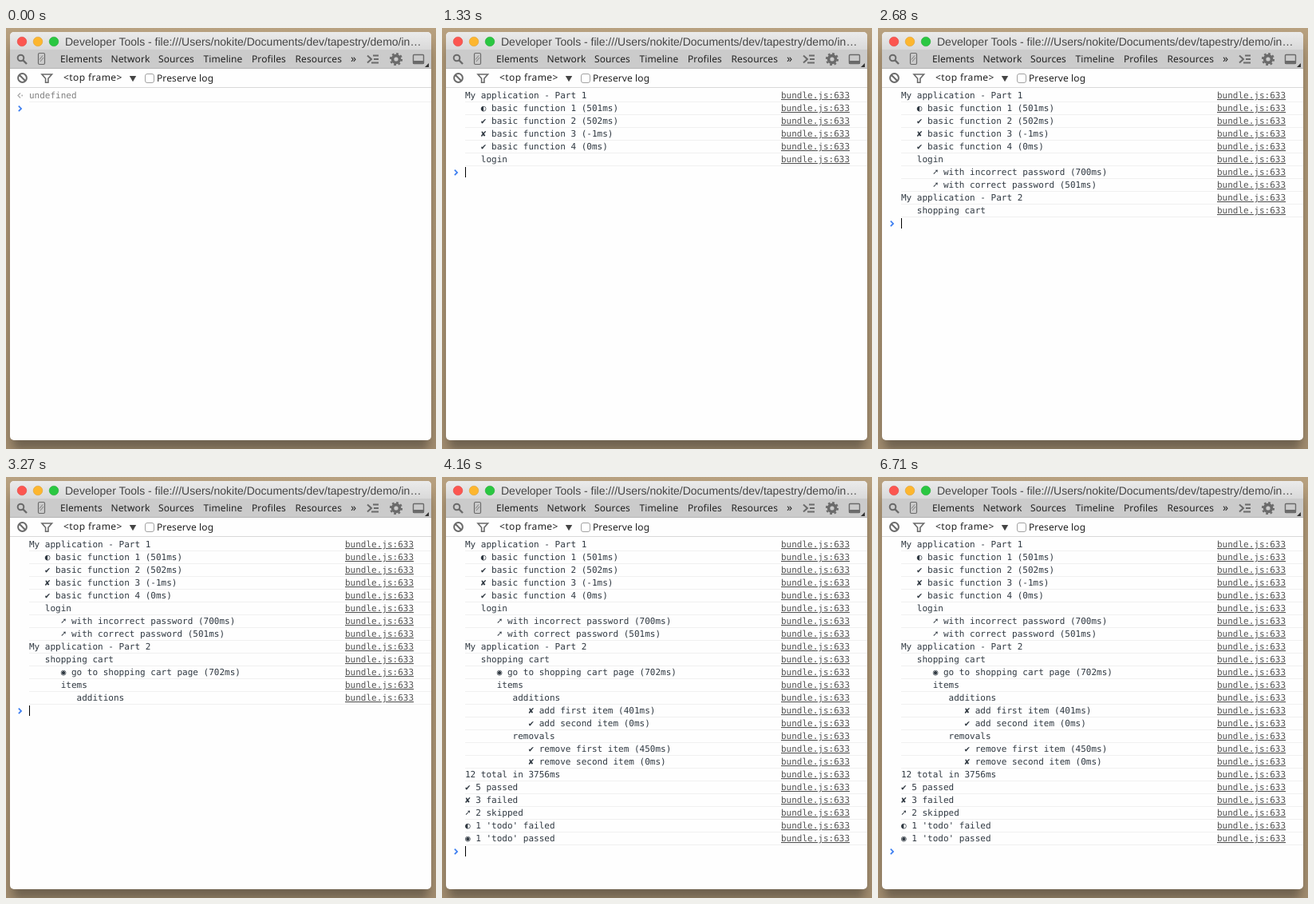
An HTML page for the animation above (7.13 s loop, 539 by 527 pixels).

```html
<!DOCTYPE html>
<html lang="en">
<head>
<meta charset="utf-8">
<title>Console test report</title>
<style>
  html, body { margin: 0; width: 100%; height: 100%; overflow: hidden; background: #a08a6b; }
  svg { display: block; width: 539px; height: 527px; }
  text { text-rendering: geometricPrecision; white-space: pre; }
  .title { font: 14px "Liberation Sans", Arial, sans-serif; fill: #454545; }
  .ui { font: 12px "Noto Sans", "Open Sans", sans-serif; letter-spacing: .1px; fill: #222; }
  .mono { font: 11px "DejaVu Sans Mono", monospace; fill: #303942; }
  .link { fill: #545454; text-decoration: underline; }
  .icon { fill: none; stroke: #6a6a6a; stroke-width: 2; }
</style>
</head>
<body>
<svg viewBox="0 0 539 527">
  <defs>
    <linearGradient id="desk" x2="0" y2="1">
      <stop offset="0" stop-color="#b8a180"/>
      <stop offset=".08" stop-color="#ab9473"/>
      <stop offset=".9" stop-color="#a18b6c"/>
      <stop offset="1" stop-color="#a18c6f"/>
    </linearGradient>
    <linearGradient id="bar" x2="0" y2="1">
      <stop offset="0" stop-color="#ebebeb"/>
      <stop offset="1" stop-color="#d9d9d9"/>
    </linearGradient>
    <filter id="soft" x="-10%" y="-10%" width="120%" height="120%">
      <feGaussianBlur stdDeviation="6"/>
    </filter>
    <clipPath id="frame"><rect x="5" y="5" width="528" height="511" rx="5"/></clipPath>
  </defs>

  <rect width="539" height="527" fill="url(#desk)"/>
  <rect x="8" y="20" width="522" height="508" rx="8" fill="#50463a" opacity=".6" filter="url(#soft)"/>

  <g clip-path="url(#frame)">
    <rect x="5" y="5" width="528" height="511" fill="#fefefe"/>
    <rect x="5" y="5" width="528" height="22" fill="url(#bar)"/>
    <rect x="5" y="27" width="528" height="24" fill="#cbcbcb"/>
    <rect x="5" y="50" width="528" height="1" fill="#b4b4b4"/>
    <rect x="5" y="74" width="528" height="1" fill="#d8d8d8"/>
  </g>

  <g stroke-width=".6">
    <circle cx="20" cy="17" r="5.8" fill="#fc5650" stroke="#df443f"/>
    <circle cx="40" cy="17" r="5.8" fill="#fdb62e" stroke="#de9f30"/>
    <circle cx="60" cy="17" r="5.8" fill="#2ac741" stroke="#22aa34"/>
  </g>
  <text class="title" x="74" y="22">Developer Tools - file:///Users/nokite/Documents/dev/tapestry/demo/in…</text>

  <g class="icon">
    <circle cx="18.5" cy="37.5" r="3.8"/>
    <path d="M21.5 40.5l4.5 4.5" stroke-width="2.4"/>
    <rect x="40.5" y="31.5" width="8" height="14" rx="1.5" stroke-width="1.2"/>
    <path d="M42 39.5l4-5M43 42l4-5" stroke-width=".8"/>
    <path d="M453 34.5l5 4.5l-5 4.5M460 34.5h7M461 39h6M458 43.5h9"/>
    <circle cx="489" cy="39" r="4.4" stroke-width="3.6"/>
    <circle cx="489" cy="39" r="7" stroke-width="2.2" stroke-dasharray="2.75"/>
    <rect x="510.5" y="33.5" width="13" height="11" rx="1" stroke-width="1.4"/>
    <path d="M510 43h14" stroke-width="4"/>
    <circle cx="20.5" cy="62.5" r="5.4"/>
    <path d="M16.7 58.7l7.6 7.6"/>
    <path d="M45 58h12.5l-4.6 5.2v5h-3.3v-5z" stroke-width="1.6"/>
  </g>
  <path d="M530 44v5h-5z" fill="#333"/>
  <path d="M154.8 60h8.4l-4.2 7.2z" fill="#444"/>
  <rect x="174.5" y="57.5" width="11" height="11" rx="2.5" fill="#fff" stroke="#a2a2a2"/>

  <g id="tabs"></g>
  <text class="ui" x="432" y="43" style="font-size:14px">»</text>
  <text class="ui" x="72" y="66" style="letter-spacing:.4px">&lt;top frame&gt;</text>
  <text class="ui" x="189" y="67">Preserve log</text>

  <g id="cleared">
    <path d="M18 81.5l-3 3l3 3" fill="none" stroke="#aaa" stroke-width="1.3"/>
    <circle cx="20.2" cy="84.5" r=".9" fill="#aaa"/>
    <text class="mono" x="29" y="88" style="fill:#808080">undefined</text>
    <rect x="29" y="92" width="504" height="1" fill="#f0f0f0"/>
  </g>
  <g id="log"></g>
  <g id="prompt">
    <path d="M15.8 81.6l3.3 3.3l-3.3 3.3" fill="none" stroke="#3b7df0" stroke-width="1.7"/>
    <rect id="caret" x="29" y="78" width="1" height="13" fill="#000"/>
  </g>
</svg>

<script>
const LOOP = 7130, ROW = 16, CELL = 6.6226, LEFT = 29;

const tabs = [[68, 'Elements'], [131.5, 'Network'], [191, 'Sources'],
              [247.5, 'Timeline'], [308, 'Profiles'], [362.5, 'Resources']];

// depth, mark, label
const lines = [
  [0, '', 'My application - Part 1'],
  [1, '◐', 'basic function 1 (501ms)'],
  [1, '✔', 'basic function 2 (502ms)'],
  [1, '✘', 'basic function 3 (-1ms)'],
  [1, '✔', 'basic function 4 (0ms)'],
  [1, '', 'login'],
  [2, '➚', 'with incorrect password (700ms)'],
  [2, '➚', 'with correct password (501ms)'],
  [0, '', 'My application - Part 2'],
  [1, '', 'shopping cart'],
  [2, '◉', 'go to shopping cart page (702ms)'],
  [2, '', 'items'],
  [3, '', 'additions'],
  [4, '✘', 'add first item (401ms)'],
  [4, '✔', 'add second item (0ms)'],
  [3, '', 'removals'],
  [4, '✔', 'remove first item (450ms)'],
  [4, '✘', 'remove second item (0ms)'],
  [0, '', '12 total in 3756ms'],
  [0, '✔', '5 passed'],
  [0, '✘', '3 failed'],
  [0, '➚', '2 skipped'],
  [0, '◐', "1 'todo' failed"],
  [0, '◉', "1 'todo' passed"]
];

// start in ms, lines logged (-1: before clearing), caret on
const steps = [
  [0, -1, 0], [290, 0, 1], [440, 1, 1], [890, 2, 1], [1330, 6, 1], [1930, 6, 0],
  [2080, 7, 1], [2680, 10, 1], [3130, 10, 0], [3270, 13, 1], [3720, 16, 1],
  [4160, 24, 1], [4760, 24, 0], [5210, 24, 1], [5660, 24, 0], [6260, 24, 1], [6710, 24, 0]
];

const byId = id => document.getElementById(id);

function add(parent, tag, attrs, text = '') {
  const node = document.createElementNS(parent.namespaceURI, tag);
  for (const key in attrs) node.setAttribute(key, attrs[key]);
  node.textContent = text;
  return parent.appendChild(node);
}

for (const [x, name] of tabs) add(byId('tabs'), 'text', { class: 'ui', x, y: 43 }, name);

const rows = lines.map(([depth, mark, label], i) => {
  const row = add(byId('log'), 'g', { transform: `translate(0 ${i * ROW})` });
  const x = LEFT + depth * 3 * CELL;
  if (mark) add(row, 'text', { class: 'mono', x, y: 88 }, mark);
  add(row, 'text', { class: 'mono', x: mark ? x + 2 * CELL : x, y: 88 }, label);
  add(row, 'text', { class: 'mono link', x: 425, y: 88 }, 'bundle.js:633');
  add(row, 'rect', { x: LEFT, y: 92, width: 504, height: 1, fill: '#f0f0f0' });
  return row;
});

const show = (node, on) => node.setAttribute('visibility', on ? 'visible' : 'hidden');

function draw() {
  const t = performance.now() % LOOP;
  const [, count, caret] = steps.findLast(step => step[0] <= t);
  show(byId('cleared'), count < 0);
  rows.forEach((row, i) => show(row, i < count));
  byId('prompt').setAttribute('transform', `translate(0 ${Math.abs(count) * ROW})`);
  show(byId('caret'), caret);
  requestAnimationFrame(draw);
}
draw();
</script>
</body>
</html>
```
